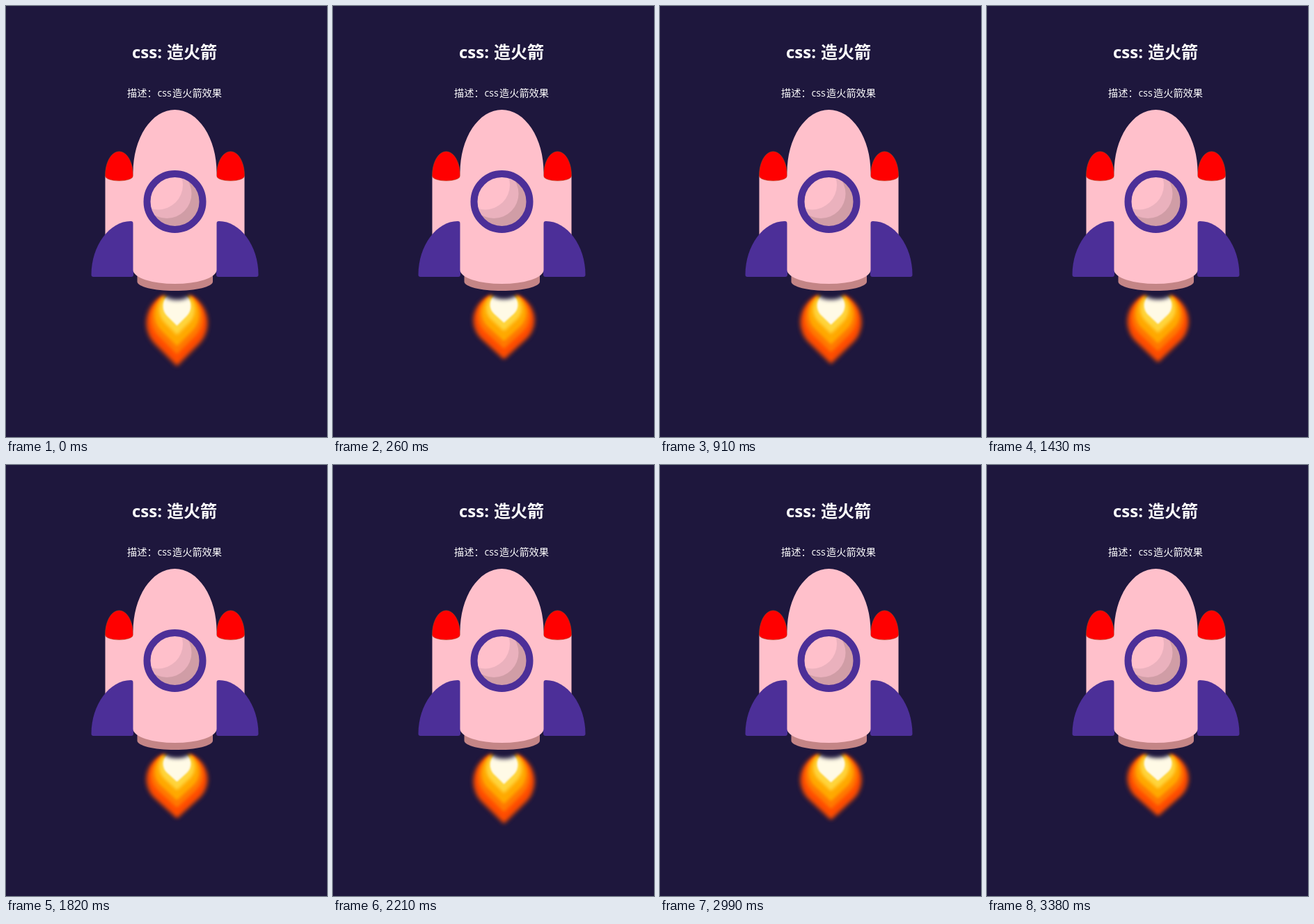
Animation, 461 px wide and 619 px high, one loop 3.51 s. Source, as an HTML page:

```html
<!DOCTYPE html>
<html lang="zh">
<head>
<meta charset="utf-8">
<title>css: 造火箭</title>
<style>
  html, body { margin: 0; width: 100%; height: 100%; overflow: hidden; background: #1e173d; }
  svg { display: block; width: 461px; height: 619px; }
  text { fill: #fff; font-family: "Open Sans", "Noto Sans CJK SC", "Noto Sans CJK", sans-serif; }
  .title { font-size: 24px; font-weight: 700; }
  .note { font-size: 14.2px; }
  .pink { fill: #ffc0cb; }
  .fin { fill: #4c2f98; }
  .cap { fill: #f00; stroke: #a8431c; stroke-width: .6; }
  #flame { transform-origin: 245.5px 411px; }
</style>
</head>
<body>
<svg viewBox="0 0 461 619">
  <defs>
    <clipPath id="glass"><circle cx="242.5" cy="281" r="35.5"/></clipPath>
    <g id="side">
      <rect class="pink" x="142.5" y="244" width="40.5" height="140"/>
      <path class="cap" d="M142.5 244 C142.5 224 151.5 209 162.5 209 S182.5 224 182.5 244 C182.5 248 173.5 251 162.5 251 S142.5 248 142.5 244Z"/>
      <path class="fin" d="M122.5 386 C122.5 344 149 309 179 309 Q183 309 183 313 V386 Q183 389 180 389 H125.500 Q122.500 389 122.500 386Z"/>
    </g>
  </defs>

  <text class="title" y="75"><tspan x="181">css:</tspan><tspan x="231">造火箭</tspan></text>
  <text class="note" y="130"><tspan x="174">描述：</tspan><tspan x="217.500">css</tspan><tspan x="239">造火箭效果</tspan></text>

  <g id="flame"></g>

  <path fill="#c48586" d="M188.500 380 H297 V396 C297 403 273 409 242.500 409 S188.500 403 188.500 396Z"/>
  <use href="#side"/>
  <use href="#side" transform="matrix(-1 0 0 1 485 0)"/>
  <path class="pink" d="M182.500 239 A60 90 0 0 1 302.500 239 V379 A60 20 0 0 1 182.500 379Z"/>

  <g clip-path="url(#glass)">
    <circle cx="242.5" cy="281" r="36" fill="#d09da6"/>
    <circle cx="231" cy="269.500" r="35.500" fill="#eab1bd"/>
    <circle class="pink" cx="218.500" cy="257" r="35.500"/>
  </g>
  <circle cx="242.5" cy="281" r="40" fill="none" stroke="#4c2f98" stroke-width="10"/>
</svg>
<script>
  const STEP = 130;
  const TOP = 411;
  const flame = document.getElementById('flame');

  function add(name, attrs, blur) {
    const el = document.createElementNS('http://www.w3.org/2000/svg', name);
    for (const key in attrs) el.setAttribute(key, attrs[key]);
    el.style.filter = `blur(${blur}px)`;
    flame.append(el);
  }

  // A circle whose two tangents meet in a point below it.
  function drop(r, fill, blur) {
    const k = r * Math.SQRT1_2;
    add('path', {
      d: `M${-k} ${k}A${r} ${r} 0 1 1 ${k} ${k}L0 ${2 * k}Z`,
      transform: `translate(245.5 ${TOP + r})`,
      fill
    }, blur);
  }

  drop(44, '#ff4d00', 3);
  drop(37, '#ff7a00', 2.5);
  drop(32, '#ffa900', 2);
  drop(25.5, '#ffd53c', 2.5);
  drop(20, '#fffae6', 1.2);
  add('ellipse', { cx: 245.5, cy: TOP, rx: 21, ry: 11, fill: '#1e173d' }, 3);

  // Flame length per step, in percent.
  const lengths = [
    100, 97, 91, 101, 96, 100.5, 94, 97, 101,
    93, 98, 95, 101, 97, 91, 100, 96, 98,
    101, 93, 97, 98, 101, 93, 97, 100, 88
  ];
  const frames = lengths.map((length, i) => ({
    offset: i / lengths.length,
    transform: `scaleY(${length / 100})`,
    easing: 'steps(1, end)'
  }));
  frames.push({ offset: 1, transform: frames[0].transform });
  flame.animate(frames, { duration: STEP * lengths.length, iterations: Infinity });
</script>
</body>
</html>
```
